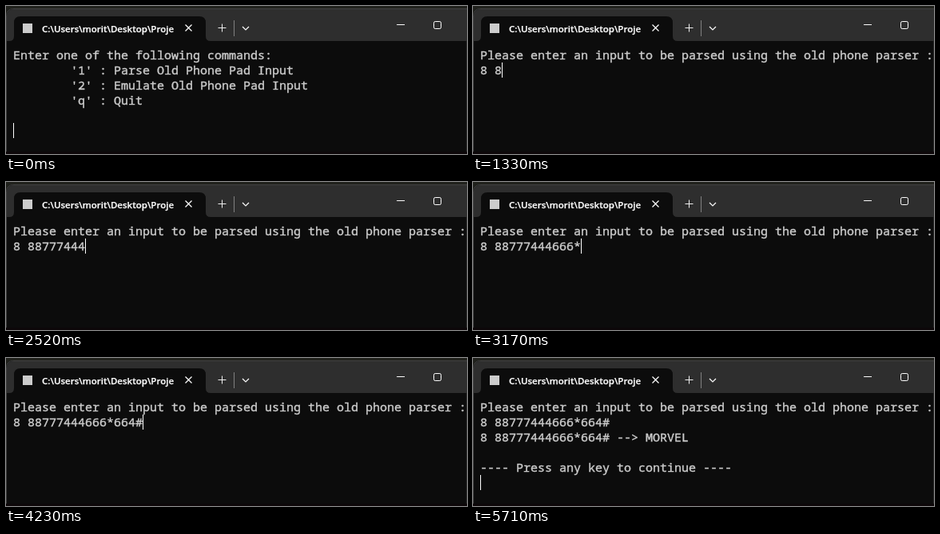
These frames come from a looping animation (577x186 px, 5.91 s). An HTML page:

```html
<!DOCTYPE html>
<html lang="en">
<head>
<meta charset="utf-8">
<title>Phone pad parser in a terminal</title>
<style>
  html, body { margin: 0; width: 577px; height: 186px; overflow: hidden; background: #0c0c0c; }
  svg, pre, #cursor { position: absolute; }
  svg { left: 0; top: 0; }
  pre {
    left: 9px; top: 52px; margin: 0; color: #ccc;
    font: 15px/19px "Noto Sans Mono", "DejaVu Sans Mono", monospace;
    font-variant-ligatures: none;
    -webkit-text-stroke: 0.4px #ccc;
  }
  #cursor { width: 1px; height: 19px; background: #fff; }
</style>
</head>
<body>
<svg width="577" height="186" fill="none">
  <rect width="577" height="12" fill="#20211c"/>
  <path d="M0.5 186V11.5a8 8 0 0 1 8-8H577V186z" fill="#0c0c0c" stroke="#414141"/>
  <path d="M1 44V11.5A7.5 7.5 0 0 1 8.5 4H577V44z" fill="#2e2e2e"/>
  <path d="M4 44q6 0 6-6V21q0-8 8-8H242q8 0 8 8V38q0 6 6 6z" fill="#0c0c0c"/>
  <rect y="183" width="577" height="3" fill="#0d0709"/>
  <rect x="21" y="22" width="12" height="12" fill="#ccc"/>
  <text x="45" y="33" fill="#fff" stroke="#fff" stroke-width="0.25" font-size="11.5" font-weight="600"
    font-family="Open Sans, Noto Sans, sans-serif">C:\Users\morit\Desktop\Proje</text>
  <path d="M224.5 23.500l8 8m0-8l-8 8" stroke="#fff" stroke-width="1.200"/>
  <path d="M265.5 27.500h10M270.500 22.500v10" stroke="#eee"/>
  <path d="M285.500 18v20" stroke="#808080"/>
  <path d="M296 26l4 4 4-4" stroke="#fff" stroke-width="1.200"/>
  <path d="M489 23.500h10" stroke="#fff"/>
  <rect x="535.5" y="19.500" width="9" height="9" rx="1.750" stroke="#fff"/>
</svg>
<pre id="screen"></pre>
<div id="cursor"></div>
<script>
const LOOP = 5910;
const menu = `Enter one of the following commands:
        '1' : Parse Old Phone Pad Input
        '2' : Emulate Old Phone Pad Input
        'q' : Quit

`;
const prompt = "Please enter an input to be parsed using the old phone parser :\n";
const input = "8 88777444666*664#";
const result = `${prompt}${input}\n${input} --> MORVEL\n\n---- Press any key to continue ----\n`;

// One time per typed key
const keys = [940, 1200, 1330, 1460, 1720, 1850, 2130, 2260, 2390, 2520,
  2790, 2920, 3050, 3170, 3440, 3570, 3840, 4230];

const screenEl = document.getElementById("screen");
const cursorEl = document.getElementById("cursor");

function contentAt(t) {
  if (t < 540) return menu;
  if (t >= 4500) return result;
  return prompt + input.slice(0, keys.filter(k => k <= t).length);
}

function draw(now) {
  const t = now % LOOP;
  const content = contentAt(t);
  const lines = content.split("\n");
  if (screenEl.textContent !== content) screenEl.textContent = content;
  cursorEl.style.left = 9 + 9 * lines.at(-1).length + "px";
  cursorEl.style.top = 52 + 19 * (lines.length - 1) + "px";
  cursorEl.style.visibility = t >= 5180 && t < 5710 ? "hidden" : "visible";
}

const start = performance.now();
function tick() {
  draw(performance.now() - start);
  requestAnimationFrame(tick);
}
tick();
</script>
</body>
</html>
```
